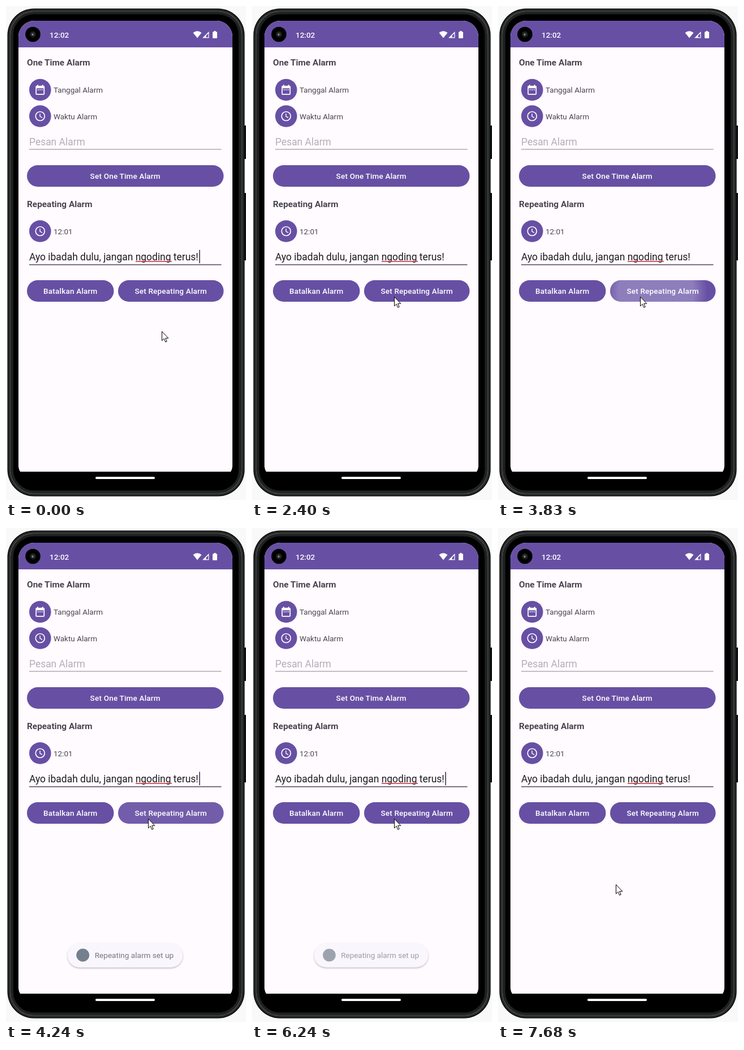
An HTML page that plays this animation: 424x872 px, repeating every 8 s.

```html
<!DOCTYPE html>
<html lang="id">
<head>
<meta charset="utf-8">
<title>Alarm</title>
<style>
html, body { margin: 0; width: 100%; height: 100%; overflow: hidden; background: #f9f9f9; }
svg { display: block; width: 424px; height: 872px; }
text { font: 13.5px Roboto, sans-serif; fill: #49454f; }
.title { font-weight: 700; font-size: 15.4px; }
.field { font-size: 17.45px; }
.label { font-weight: 500; fill: #fff; text-anchor: middle; letter-spacing: .2px; }
.purple { fill: #6750a4; }
</style>
</head>
<body>
<svg viewBox="0 0 424 872">
  <defs>
    <clipPath id="screen"><path d="M22 822V54a28 28 0 0 1 28-28H372a28 28 0 0 1 28 28V813q-.5 5-3 9H25q-2.500-4-3-9z"/></clipPath>
    <clipPath id="button"><rect x="198" y="484" width="186.500" height="38" rx="19"/></clipPath>
    <radialGradient id="glow">
      <stop offset=".72" stop-color="#fff"/>
      <stop offset="1" stop-color="#fff" stop-opacity="0"/>
    </radialGradient>
    <filter id="shadow" x="-10%" y="-20%" width="120%" height="150%">
      <feDropShadow dx="0" dy="1.500" stdDeviation="1.500" flood-opacity=".3"/>
    </filter>
    <g id="clock">
      <circle r="19.300" class="purple"/>
      <g fill="none" stroke="#fff" stroke-width="1.700"><circle r="8"/><path d="M-.2-4.500V.4L3.700 2.700" stroke-width="1.400"/></g>
    </g>
  </defs>

  <!-- phone body -->
  <path d="M420 211h4v59h-4zM420 330h4v119h-4z" fill="#151515"/>
  <g fill="none">
    <rect x="2.500" y="4.500" width="419" height="861" rx="47" fill="#080808"/>
    <rect x="5" y="7" width="414" height="856" rx="45" stroke="#292b2b" stroke-width="2"/>
    <rect x="7.500" y="9.500" width="409" height="851" rx="42" stroke="#454848" stroke-width="2"/>
    <rect x="10.500" y="12.500" width="403" height="845" rx="39" stroke="#202222" stroke-width="4"/>
    <rect x="14" y="15" width="396" height="840" rx="36" fill="#000"/>
  </g>
  <g clip-path="url(#screen)">
    <path d="M22 26H400V822H22z" fill="#fffbff"/>
    <path d="M22 26H400V73H22z" class="purple"/>
  </g>
  <rect x="158" y="831" width="105" height="4" rx="2" fill="#fff"/>

  <!-- status bar -->
  <circle cx="47.500" cy="50" r="13.300"/>
  <circle cx="47.500" cy="50" r="5.500" fill="#1c1c1c"/>
  <circle cx="47.500" cy="50" r="3" fill="#383a3a"/>
  <circle cx="47" cy="50.500" r="1.200" fill="#a0a0a0"/>
  <text x="77" y="55.500" style="font-weight:500;fill:#fff">12:02</text>
  <g fill="#fff">
    <path d="M330.500 47.200Q338 41.500 345.500 47.200L338 56.500z"/>
    <path d="M347 56.500L358.500 45V56.500z"/>
    <path d="M353.500 52.200L357.300 48.400V55.300H353.500z" class="purple"/>
    <path d="M367.500 44h3v1.500h1.500q1 0 1 1V56q0 1-1 1h-6q-1 0-1-1V46.500q0-1 1-1h1.500z"/>
  </g>

  <!-- one time alarm -->
  <text x="37" y="105" class="title">One Time Alarm</text>
  <circle cx="60.300" cy="148" r="19.300" class="purple"/>
  <path transform="translate(49.700 137.300) scale(.88)" fill="#fff" d="M9 11H7v2h2v-2zm4 0h-2v2h2v-2zm4 0h-2v2h2v-2zm2-7h-1V2h-2v2H8V2H6v2H5c-1.100 0-2 .9-2 2v14c0 1.100.9 2 2 2h14c1.100 0 2-.9 2-2V6c0-1.100-.9-2-2-2zm0 16H5V9h14v11z"/>
  <text x="84" y="153.300">Tanggal Alarm</text>
  <use href="#clock" x="60.300" y="194.500"/>
  <text x="84" y="199.800">Waktu Alarm</text>
  <text x="41" y="246" class="field" style="fill:#b2aeb5">Pesan Alarm</text>
  <path d="M41 252.500H380.500V253.600H41z" fill="#858188"/>
  <rect x="37" y="281" width="347.500" height="38" rx="19" class="purple"/>
  <text x="210.700" y="305" class="label">Set One Time Alarm</text>

  <!-- repeating alarm -->
  <text x="37" y="354.500" class="title">Repeating Alarm</text>
  <use href="#clock" x="60.300" y="397.500"/>
  <text x="84" y="403">12:01</text>
  <text x="41" y="449" class="field" style="fill:#1c1b1f">Ayo ibadah dulu, jangan ngoding terus!</text>
  <path d="M229 450H293V451.800H229z" fill="#d0444c"/>
  <path d="M41 455.800H380.500V457.600H41z" fill="#625b71"/>
  <path id="caret" d="M341 430.500H343V454H341z" fill="#625b71"/>
  <rect x="37" y="484" width="153.500" height="38" rx="19" class="purple"/>
  <text x="113.800" y="508" class="label">Batalkan Alarm</text>
  <rect x="198" y="484" width="186.500" height="38" rx="19" class="purple"/>
  <g clip-path="url(#button)"><circle id="ripple" fill="url(#glow)"/></g>
  <text x="291.200" y="508" class="label">Set Repeating Alarm</text>

  <g id="toast">
    <rect x="108.500" y="733" width="204" height="42.500" rx="21.250" fill="#f9f7fd" filter="url(#shadow)"/>
    <g id="message">
      <circle cx="135.500" cy="754" r="11.500" fill="#2c3e50"/>
      <text x="156.500" y="759" style="font-size:13.65px;fill:#303038">Repeating alarm set up</text>
    </g>
  </g>

  <path id="pointer" d="M.5.5V16.700L4.200 13.200L6.700 19.200L9.200 18.100L6.700 12.300H11.800z" fill="#fff" stroke="#000"/>
</svg>
<script>
const LOOP = 8000;
const [caret, ripple, toast, message, pointer] =
  ['caret', 'ripple', 'toast', 'message', 'pointer'].map(id => document.getElementById(id));

const blinks = [400, 880, 1420, 1870, 2400, 2880, 3420, 4010, 4580, 5030, 5510, 6040, 6570, 7060, 7620];
// time, x, y of the pointer tip
const route = [[70, 275, 574], [510, 251, 513], [6420, 251, 513], [6730, 234, 578], [6920, 226, 596], [7480, 208, 629]];

const ramp = (t, start, length) => Math.min(1, Math.max(0, (t - start) / length));
const mix = (a, b, k) => a + (b - a) * k;
const easeOut = k => 1 - (1 - k) ** 3;
const set = (node, attrs) => { for (const name in attrs) node.setAttribute(name, attrs[name]); };

function pointerAt(t) {
  let [, x, y] = route[0];
  for (let i = 1; i < route.length; i++) {
    const [start] = route[i - 1], [end, nextX, nextY] = route[i];
    const k = ramp(t, start, end - start);
    x = mix(x, nextX, k);
    y = mix(y, nextY, k);
  }
  return `translate(${Math.round(x)} ${Math.round(y)})`;
}

function draw(t) {
  set(caret, { opacity: blinks.filter(time => time <= t).length % 2 ? 0 : 1 });
  set(pointer, { transform: pointerAt(t) });

  const spread = ramp(t, 3500, 480);
  set(ripple, {
    cx: mix(252, 291, spread),
    cy: mix(513, 503, spread),
    r: mix(10, 128, spread),
    opacity: .26 * ramp(t, 3500, 90) * (1 - ramp(t, 4030, 300)),
  });

  const scale = .9 + .1 * easeOut(ramp(t, 4010, 333)) - .1 * ramp(t, 6150, 250) ** 2;
  set(toast, {
    opacity: ramp(t, 4010, 66) * (1 - ramp(t, 6300, 100)),
    transform: `translate(210.5 754.3) scale(${scale}) translate(-210.5 -754.3)`,
  });
  set(message, { opacity: ramp(t, 4060, 283) * (1 - ramp(t, 6150, 166)) });
}

function tick() {
  draw(performance.now() % LOOP);
  requestAnimationFrame(tick);
}
tick();
</script>
</body>
</html>
```
